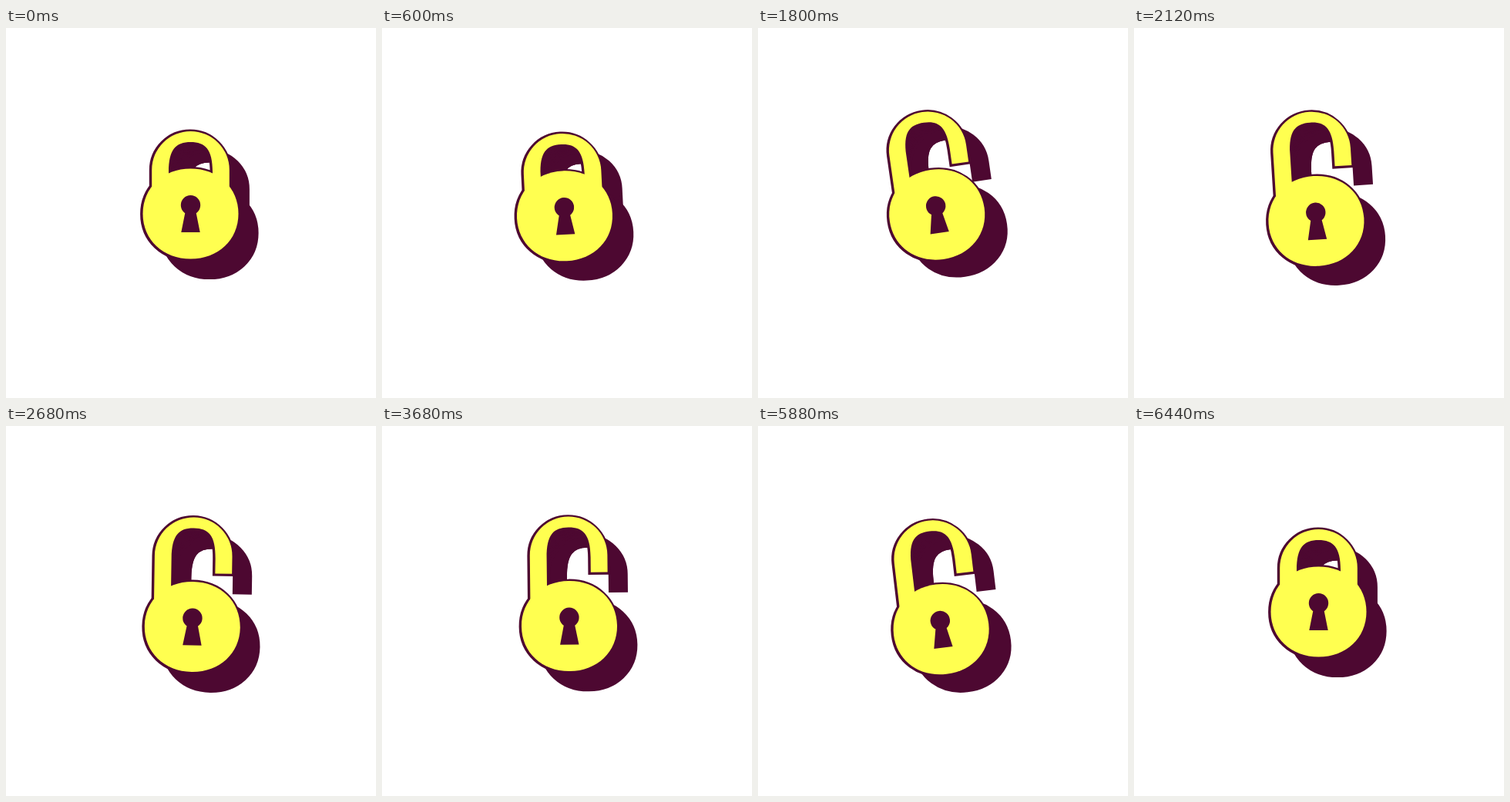
An HTML page with a canvas for the animation above (6480 ms loop, 480x480 px).

```html
<!DOCTYPE html>
<html lang="en">
<head>
<meta charset="utf-8">
<title>Padlock</title>
<style>
  html, body { margin: 0; width: 100%; height: 100%; overflow: hidden; background: #fff; }
  canvas { display: block; width: 480px; height: 480px; }
</style>
</head>
<body>
<canvas id="stage" width="480" height="480"></canvas>
<script>
const LOOP = 6480, STEP = 40;
const YELLOW = '#ffff50', DARK = '#4d0831';
const SHADOW = { x: 24.5, y: 25 };

const body = new Path2D(
  'M-62 0 C-62 -34 -35.5 -58.5 0 -58.5 S62 -34 62 0 S35.5 58.5 0 58.5 S-62 34 -62 0 Z');

const shackle = new Path2D(
  'M-50.3 5 V-57 A50.3 50 0 0 1 50.3 -57 V-34.5 H28.5 V-54 ' +
  'C28.5 -84 19 -93 0 -93 S-28.5 -84 -28.5 -54 V5 Z');

// Left half of the shackle, which has visible depth
const shackleSide = new Path2D(
  'M-50.3 5 V-57 A50.3 50 0 0 1 0 -107 V-93 C-19 -93 -28.5 -84 -28.5 -54 V5 Z');

const keyhole = new Path2D('M-7 -2 H7 L12.2 24 H-12.2 Z');
keyhole.arc(0, -11.2, 12.7, 0, Math.PI * 2);

const ctx = document.getElementById('stage').getContext('2d');

const progress = (t, from, to) => Math.min(1, Math.max(0, (t - from) / (to - from)));

function ramp(t, from, to) {
  const u = progress(t, from, to);
  return u * u * (3 - 2 * u);
}

const bump = (t, from, peak, to) => ramp(t, from, peak) - ramp(t, peak, to);

function pose(t) {
  const drift = ramp(t, 1900, 3800) - ramp(t, 5900, 6160);
  const tilt = -3 * bump(t, 0, 680, 1160)      // wind up
    - 8.4 * bump(t, 1380, 1840, 2350)          // spring open
    + 1.1 * bump(t, 2200, 2680, 3600)          // settle
    - 6.2 * bump(t, 5080, 5870, 6160)          // swing shut
    - 0.6 * drift;
  const y = 241 + 15 * progress(t, 0, 1380) ** 2
    - 15.5 * ramp(t, 1380, 1900)
    + 20.5 * ramp(t, 1800, 2450)
    + 4.2 * ramp(t, 5200, 5880)
    - 24.2 * ramp(t, 5880, 6160)
    - 1.5 * drift;
  const lift = 35 * (ramp(t, 1520, 1920) - ramp(t, 5960, 6320));
  return { x: 239.5 + 0.88 * tilt + 4.1 * drift, y, tilt, lift };
}

function shifted(x, y, paint) {
  ctx.save();
  ctx.translate(x, y);
  paint();
  ctx.restore();
}

function paint(shape, color, outline) {
  ctx.fillStyle = ctx.strokeStyle = color;
  ctx.lineWidth = outline * 2;
  ctx.fill(shape);
  if (outline) ctx.stroke(shape);
}

function paintLock(lift, color, outline) {
  shifted(0, -lift, () => paint(shackle, color, outline));
  paint(body, color, outline);
}

function draw(t) {
  const { x, y, tilt, lift } = pose(t);
  ctx.fillStyle = '#fff';
  ctx.fillRect(0, 0, 480, 480);
  ctx.save();
  ctx.translate(x, y);
  ctx.rotate(tilt * Math.PI / 180);

  shifted(SHADOW.x, SHADOW.y, () => paintLock(lift, DARK, 1.6));
  for (let d = 0; d <= 1; d += 1 / 32) {
    shifted(SHADOW.x * d, SHADOW.y * d - lift, () => paint(shackleSide, DARK, 1.6));
  }
  shifted(-0.6, 0.4, () => paintLock(lift, DARK, 2.8));
  paintLock(lift, YELLOW, 0);
  paint(keyhole, DARK, 0);
  ctx.restore();
}

const start = performance.now();
function tick() {
  const t = (performance.now() - start) % LOOP;
  draw(Math.floor(t / STEP) * STEP);
  requestAnimationFrame(tick);
}
tick();
</script>
</body>
</html>
```
